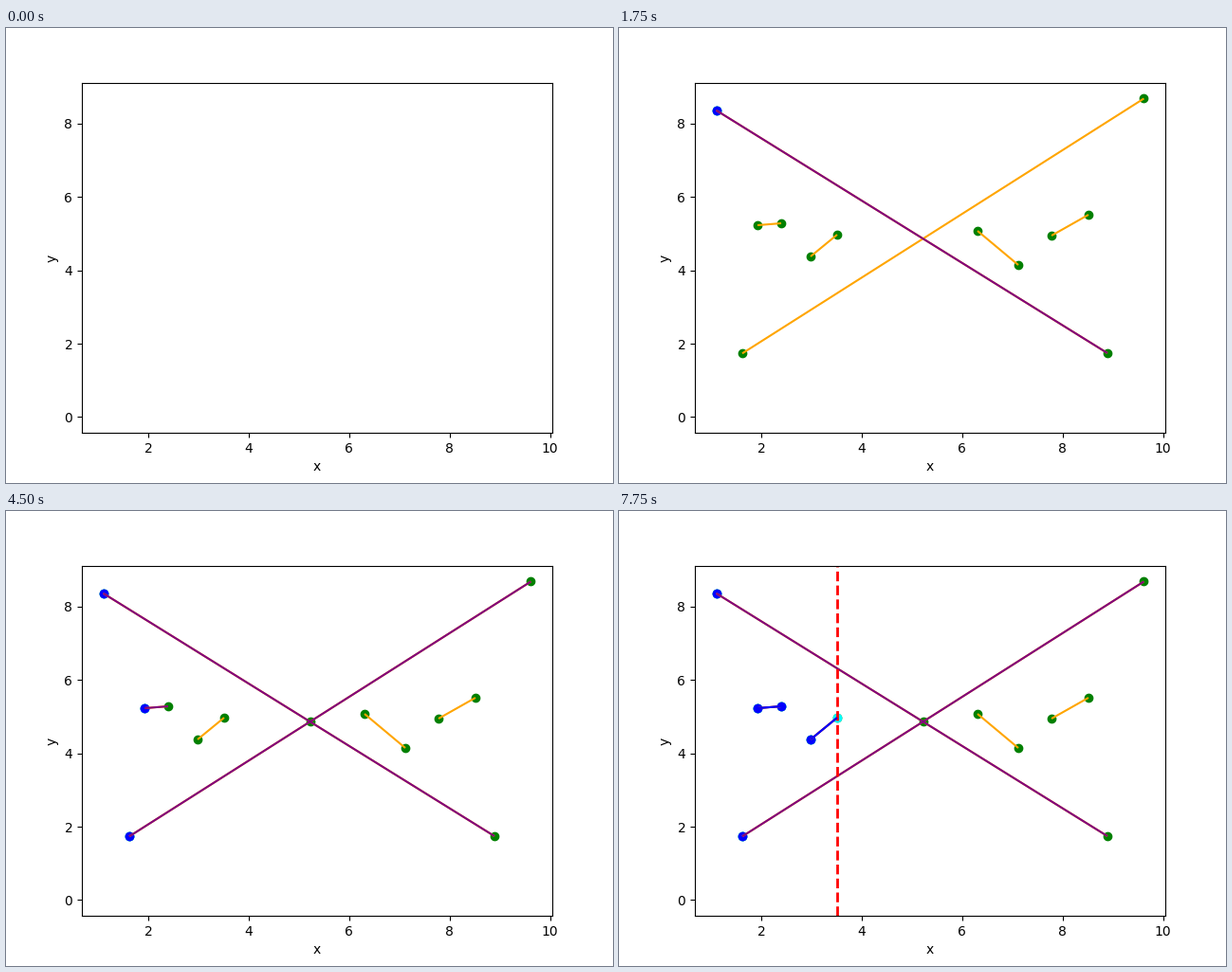
Animation of 640 by 480 pixels, one loop 8000 ms. Source, as a matplotlib script:

```python
import matplotlib.pyplot as plt
from matplotlib.animation import FuncAnimation
from matplotlib.collections import LineCollection

FRAMES, STEP_MS = 32, 250

# Segments, left end first.
SEGMENTS = [
    ((1.105, 8.363), (8.894, 1.742)),
    ((1.623, 1.735), (9.620, 8.685)),
    ((1.926, 5.231), (2.398, 5.283)),
    ((2.983, 4.378), (3.512, 4.973)),
    ((6.307, 5.076), (7.119, 4.146)),
    ((7.780, 4.947), (8.516, 5.516)),
]
POINTS = [p for s in SEGMENTS for p in s]


def padded(values, pad=0.05):
    lo, hi = min(values), max(values)
    return lo - pad * (hi - lo), hi + pad * (hi - lo)


xs, ys = zip(*POINTS)
fig, ax = plt.subplots(figsize=(6.4, 4.8), dpi=100)
ax.set(xlim=padded(xs), ylim=padded((0, *ys)), xlabel="x", ylabel="y")

timeline = []  # (artist, first frame, end frame)


def show(artist, start, end=FRAMES):
    timeline.append((artist, start, end))


def add_points(points, color, start):
    show(ax.scatter(*zip(*points), color=color), start)


def add_segments(segments, color, start):
    lines = LineCollection(segments, colors=color, linewidths=1.5)
    show(ax.add_collection(lines, autolim=False), start)


def add_sweep(x, start, end):
    show(ax.axvline(x, color="red", linestyle="--", linewidth=2), start, end)


def crossing(s, t):
    (ax0, ay0), (ax1, ay1) = s
    (bx0, by0), (bx1, by1) = t
    dx, dy, ex, ey = ax1 - ax0, ay1 - ay0, bx1 - bx0, by1 - by0
    k = ((bx0 - ax0) * ey - (by0 - ay0) * ex) / (dx * ey - dy * ex)
    return ax0 + k * dx, ay0 + k * dy


add_points(POINTS, "green", 1)
add_segments(SEGMENTS, "orange", 2)

# Sweep the end points from left to right until the loop is full.
start = 3
for point in sorted(POINTS):
    if start >= FRAMES:
        break
    segment = next(s for s in SEGMENTS if point in s)
    opens = point == segment[0]
    meets = segment is SEGMENTS[1]  # crosses the first segment
    done = start + 3 + meets
    add_sweep(point[0], start, done + 1)
    add_points([point], "cyan", start + 1)
    add_segments([segment], "purple" if opens else "blue", start + 2)
    if meets:
        add_points([crossing(SEGMENTS[0], segment)], "green", start + 3)
    add_points([point], "blue", done)
    start = done + 2


def update(frame):
    for artist, first, end in timeline:
        artist.set_visible(first <= frame < end)
    return [artist for artist, _, _ in timeline]


anim = FuncAnimation(fig, update, frames=FRAMES, interval=STEP_MS,
                     repeat=True, repeat_delay=0, blit=False)
plt.show()
```
